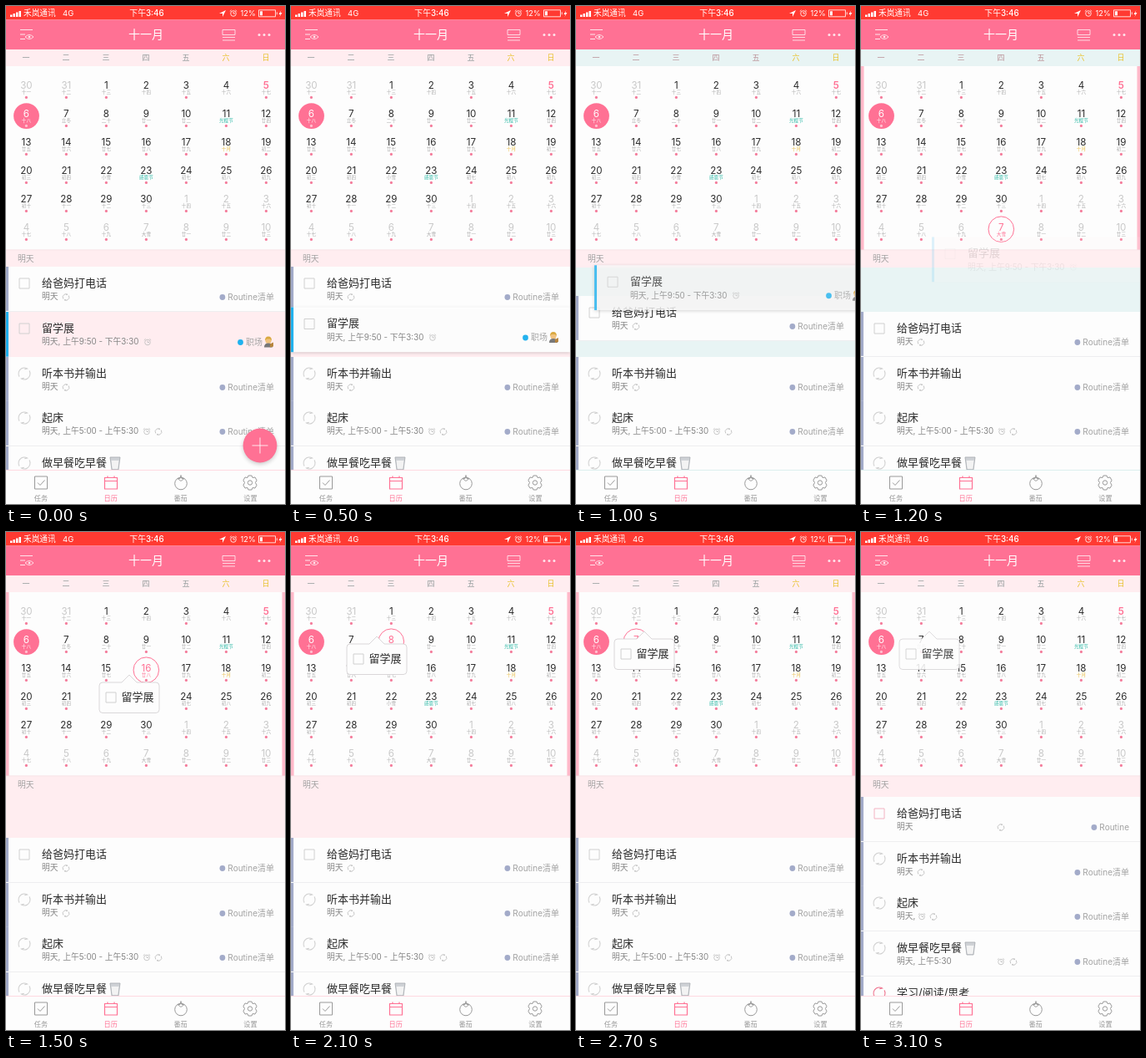
Write an HTML page with a canvas that moves like this. It is 335 px wide and 596 px high and loops after 3.2 s.

```html
<!DOCTYPE html>
<html lang="zh-CN">
<head>
<meta charset="utf-8">
<style>
  html, body { margin: 0; width: 100%; height: 100%; overflow: hidden; background: #fdfdfd; }
  canvas { display: block; width: 335px; height: 596px; }
</style>
</head>
<body>
<canvas id="stage"></canvas>
<script>
const W = 335, H = 596, LOOP = 3200, STEP = 100;
const PINK = '#ff7194', BLUSH = '#ffedf0', MIST = '#e8f4f4', SLATE = '#a3abc9', SKY = '#1fb1ee';
const PAPER = '#fdfdfd', INK = '#2b2b2b', GREY = '#999', PALE = '#c8c8c8', SOFT_WHITE = 'rgba(255,255,255,.82)';
const LIST_TOP = 312.6, ROW = 53.7, FIRST_COL = 24, COL = 48, FIRST_ROW = 95.6, LINE = 34;

const canvas = document.getElementById('stage');
const scale = window.devicePixelRatio || 1;
canvas.width = W * scale;
canvas.height = H * scale;
const c = canvas.getContext('2d');
c.scale(scale, scale);

const clamp = x => Math.max(0, Math.min(1, x));
const smooth = (t, a, b) => { const p = clamp((t - a) / (b - a)); return p * p * (3 - 2 * p); };

// Interpolates [time, value] pairs.
function track(t, ...keys) {
  let i = 0;
  while (i < keys.length - 2 && t > keys[i + 1][0]) i++;
  const [a, from] = keys[i], [b, to] = keys[i + 1];
  return from + (to - from) * clamp((t - a) / (b - a));
}

function rect(x, y, w, h, color) { c.fillStyle = color; c.fillRect(x, y, w, h); }

function text(s, x, y, size, color, align = 'left', weight = 400) {
  c.font = `${weight} ${size}px Inter, "Noto Sans CJK SC", "Noto Sans CJK", sans-serif`;
  c.textAlign = align;
  c.textBaseline = 'middle';
  c.fillStyle = color;
  c.fillText(s, x, y);
}

function disc(x, y, r, color) {
  c.beginPath(); c.arc(x, y, r, 0, 7); c.fillStyle = color; c.fill();
}

function ring(x, y, r, color, width = 1) {
  c.beginPath(); c.arc(x, y, r, 0, 7); c.strokeStyle = color; c.lineWidth = width; c.stroke();
}

function stroke(d, x, y, color, width = 1) {
  c.save();
  c.translate(x, y);
  c.strokeStyle = color;
  c.lineWidth = width;
  c.stroke(new Path2D(d));
  c.restore();
}

function shape(d, x, y, color) {
  c.save();
  c.translate(x, y);
  c.fillStyle = color;
  c.fill(new Path2D(d));
  c.restore();
}

function withAlpha(alpha, draw) {
  c.save(); c.globalAlpha = alpha; draw(); c.restore();
}

function shadowed(blur, dy, draw) {
  c.save();
  c.shadowColor = 'rgba(0,0,0,.2)';
  c.shadowBlur = blur * scale;
  c.shadowOffsetY = dy * scale;
  draw();
  c.restore();
}

const checkbox = (x, y, color = '#d0d0d0') => stroke('M-6-6H6V6H-6Z', x, y, color);

function repeatIcon(x, y, r, color) {
  for (const side of [0, Math.PI]) {
    c.save();
    c.translate(x, y);
    c.rotate(side - Math.PI / 4);
    c.beginPath();
    c.arc(0, 0, r, -2.9, -0.25);
    c.lineTo(r * 0.55, -r * 0.5);
    c.strokeStyle = color;
    c.lineWidth = r > 5 ? 1 : 0.8;
    c.stroke();
    c.restore();
  }
}

function alarmIcon(x, y, color, r = 3.3) {
  ring(x, y, r, color, 0.8);
  stroke('M0-2V0H2M-4.2-2.6L-2.4-4.2M4.2-2.6L2.4-4.2', x, y, color, 0.8);
}

function statusBar() {
  rect(0, 0, W, 16.5, '#ff3a32');
  for (let i = 0; i < 4; i++) rect(5 + i * 3.5, 10.5 - i * 1.5, 2.5, 2.5 + i * 1.5, '#fff');
  text('禾岚通讯', 21, 9.4, 9.7, '#fff');
  text('4G', 68, 9.4, 9.5, '#fff');
  text('下午3:46', 169, 9.4, 9.8, '#fff', 'center', 500);
  shape('M4-4L0 4V0H-4Z', 260, 9, '#fff');
  alarmIcon(273, 9, '#fff');
  text('12%', 281.5, 9.4, 9.2, '#fff');
  stroke('M0 0H20V8H0ZM21.8 2.5V5.5', 303.5, 4.8, '#fff', 0.8);
  rect(305, 6.3, 3, 5, '#fff');
  shape('M1-4L-2 1H0L-1 4L2-1H0Z', 329.5, 9, '#fff');
}

function navBar() {
  rect(0, 16.5, W, 35.5, PINK);
  stroke('M0 0H15M0 5.5H6M0 11H6', 17, 28.5, SOFT_WHITE);
  stroke('M-5 0Q0-5 5 0Q0 5-5 0Z', 28, 37, SOFT_WHITE, 0.9);
  disc(28, 37, 1.3, SOFT_WHITE);
  text('十一月', 168, 35, 14, '#fff', 'center');
  stroke('M0 0H15V6H0ZM0 9H15M0 12.5H15', 260, 28.5, SOFT_WHITE, 0.9);
  for (const x of [304, 310, 316]) disc(x, 34.5, 1.5, SOFT_WHITE);
}

const LUNAR = `十一 十二 十三 十四 十五 十六 十七
十八 立冬 二十 廿一 廿二 光棍节 廿四
廿五 廿六 廿七 廿八 廿九 十月 初二
初三 初四 小雪 感恩节 初七 初八 初九
初十 十一 十二 十三 十四 十五 十六
十七 十八 十九 大雪 廿一 廿二 廿三`.split(/\s+/);
const LUNAR_COLORS = { 光棍节: '#2bb8a5', 感恩节: '#2bb8a5', 十月: '#e9bd45' };

function calendar(hover, tinted, dropping) {
  rect(0, 52, W, 20, tinted ? MIST : BLUSH);
  [...'一二三四五六日'].forEach((day, i) =>
    text(day, FIRST_COL + i * COL, 62, 9, i > 4 ? '#e8c22c' : tinted ? '#b98f96' : '#909a9a', 'center'));
  rect(0, 72, W, 220, PAPER);
  if (dropping) {
    rect(0, 72, 3.5, 220, '#ffb9ca');
    rect(W - 3.5, 72, 3.5, 220, '#ffb9ca');
  }
  LUNAR.forEach((lunar, i) => {
    const x = FIRST_COL + (i % 7) * COL, y = FIRST_ROW + Math.floor(i / 7) * LINE;
    const offset = i - 2;
    const inMonth = offset >= 0 && offset < 30;
    const day = offset < 0 ? offset + 32 : offset % 30 + 1;
    const selected = i === 7, hovered = i === hover;
    if (selected) disc(x + 0.5, y + 2, 15.4, PINK);
    if (hovered) ring(x + 0.3, y + 1.6, 15.3, PINK);
    const accent = selected ? '#fff' : hovered ? PINK : null;
    text(day, x + 0.4, y, 11.6, accent || (i === 6 ? PINK : inMonth ? INK : PALE), 'center', i === 6 ? 600 : 400);
    text(lunar, x + 0.4, y + 8, 5.6, accent || LUNAR_COLORS[lunar] || '#aaa', 'center');
    if (i !== 3 && i !== 5) disc(x + 0.4, y + 13.8, 1.6, selected ? '#ffc0cf' : '#f47c9b');
  });
}

function tag(y, label, color) {
  text(label, 322, y, 10, '#a3a3a3', 'right');
  disc(322 - c.measureText(label).width - 6.5, y, 3.4, color);
}

function cup(x, y) {
  shape('M-6-7H6L4 8H-4Z', x, y, '#cfd2d6');
  shape('M-4.5-3H4.5L3.3 7H-3.3Z', x, y, '#f3f3f3');
  stroke('M-6-7H6L4 8H-4Z', x, y, '#a4a7ac', 0.8);
}

function worker(x, y) {
  disc(x, y - 2, 3.6, '#f1c27d');
  shape('M-4-2Q-4-7 0-7T4-2L2-4H-2Z', x, y, '#d9a93f');
  shape('M-5 6Q-5 1 0 1T5 6Z', x, y, '#777');
  shape('M2 2L6 0V5L2 6Z', x, y, '#b7843c');
}

function row(y, { title, sub, icons = [], label, once, accent }) {
  const top = Math.floor(y);
  rect(0, top, W, ROW + 0.3, PAPER);
  rect(0, top, 3, ROW - 0.8, SLATE);
  rect(3, top + 53, W, 0.8, '#ececee');
  if (once) checkbox(22, top + 20, accent || '#d0d0d0');
  else repeatIcon(22, top + 20, 7, accent || '#cfcfcf');
  text(title, 43, top + 20, 13, INK);
  if (title.startsWith('做早餐')) cup(131, top + 20);
  text(sub, 43, top + 36.5, 9.8, '#858585');
  for (const [kind, x] of icons)
    kind === 'alarm' ? alarmIcon(x, top + 36.5, '#bcbcbc') : repeatIcon(x, top + 36.5, 3.8, '#bcbcbc');
  if (label) tag(top + 36.5, label, SLATE);
}

const listName = 'Routine清单';
const rowsFor = recycled => [
  { title: '给爸妈打电话', sub: '明天', icons: [['repeat', recycled ? 168 : 72]],
    label: recycled ? 'Routine' : listName, once: true, accent: recycled && '#f3b3c2' },
  { title: '听本书并输出', sub: '明天', icons: [['repeat', 72]], label: listName },
  { title: '起床', sub: recycled ? '明天,' : '明天, 上午5:00 - 上午5:30',
    icons: [['alarm', recycled ? 73 : 169], ['repeat', recycled ? 87 : 183]], label: listName },
  { title: '做早餐吃早餐', sub: '明天, 上午5:30', icons: [['alarm', 168], ['repeat', 183]], label: listName },
  { title: '学习/阅读/思考', sub: '明天', accent: '#ee6d89' }
];

function card(x, top, lifted) {
  const paint = () => rect(x, top, W, ROW, lifted ? PAPER : BLUSH);
  if (lifted) shadowed(4, 1, paint); else paint();
  rect(x, top, 3, ROW, SKY);
  checkbox(x + 22, top + 20);
  text('留学展', x + 43, top + 20, 13, INK);
  text('明天, 上午9:50 - 下午3:30', x + 43, top + 36.5, 9.8, '#858585');
  alarmIcon(x + 170, top + 36.5, '#bcbcbc');
  disc(x + 281.5, top + 36.5, 3.4, SKY);
  text('职场', x + 288, top + 36.5, 10, '#a3a3a3');
  worker(x + 315, top + 36.5);
}

function bubble(x, y) {
  c.save();
  c.translate(x, y);
  const p = new Path2D('M0 0L9 9H32Q36 9 36 13V41.5Q36 45.5 32 45.5H-32Q-36 45.5-36 41.5V13Q-36 9-32 9H-9Z');
  c.fillStyle = PAPER;
  c.fill(p);
  c.strokeStyle = '#d6d3d5';
  c.lineWidth = 0.9;
  c.stroke(p);
  checkbox(-22, 27);
  text('留学展', -9.5, 27, 13, INK);
  c.restore();
}

function tabBar(tinted) {
  rect(0, 555, W, 41, PAPER);
  rect(0, 555, W, 1, tinted ? '#dcefee' : '#ffd9e1');
  stroke('M-7.5-7.5H7.5V7.5H-7.5ZM-4 0L-1 3L4.5-3', 42, 570.5, GREY);
  stroke('M-7.5-6H7.5V7.5H-7.5ZM-7.5-2H7.5M-4-8V-6M4-8V-6', 126, 570.5, PINK, 1.2);
  ring(210, 571.5, 7.3, GREY);
  stroke('M-4-5L-1-5L0-9L1-5L4-5L0-2Z', 210, 570.5, GREY, 0.9);
  stroke('M-2-8.5H2L3-6L6-6.5L8-3L6.5 0L8 3L6 6.5L3 6L2 8.5H-2L-3 6L-6 6.5L-8 3L-6.5 0L-8-3L-6-6.5L-3-6Z', 293, 570.5, GREY);
  ring(293, 570.5, 2.7, GREY);
  ['任务', '日历', '番茄', '设置'].forEach((s, i) =>
    text(s, 42 + i * 83.8, 590, 8.2, i === 1 ? PINK : GREY, 'center'));
}

function addButton() {
  shadowed(5, 2, () => disc(305, 526, 20.4, PINK));
  stroke('M-9.5 0H9.5M0-9.5V9.5', 305, 526, SOFT_WHITE);
}

function draw(t) {
  const tinted = t >= 700 && t < 1300;
  const dropping = t >= 1100 && t < 2900;
  const tipX = track(t, [1200, 152], [1500, 148], [2100, 103], [2300, 92], [2600, 82]);
  const tipY = track(t, [1200, 262], [1500, 171], [2100, 125], [2300, 121], [2600, 119]);
  const hover = dropping
    ? Math.floor(tipX / COL) + 7 * Math.round((tipY - FIRST_ROW - 2) / LINE) : -1;

  rect(0, 0, W, H, PAPER);
  calendar(hover, tinted, dropping);

  rect(0, 292, W, 264, tinted ? MIST : BLUSH);
  rect(0, 292, W, 21, BLUSH);
  rect(0, 291.5, W, 0.8, '#f5dde2');
  text('明天', 14, 303, 9.8, '#a0a0a0');

  // The first row makes room for the card; afterwards all rows close the gap.
  const push = smooth(t, 850, 1100);
  const closing = 1 - (1 - clamp((t - 2900) / 285)) ** 2;
  rowsFor(t >= 2900).forEach((item, i) => {
    const slot = i === 0 ? push : 1;
    row(LIST_TOP + (i + slot - closing) * ROW, item);
  });

  if (t < 1300) {
    const top = track(t, [400, 366], [800, 344], [1200, 276.5]);
    const x = 85 * smooth(t, 900, 1200);
    const alpha = track(t, [400, 1], [800, 0.93], [1000, 0.8], [1200, 0.14]);
    withAlpha(alpha, () => card(x, top, t >= 300 && t < 1150));
  }
  if (t > 1200) {
    const alpha = Math.min(clamp((t - 1200) / 150), track(t, [2950, 1], [3100, 0.88]));
    withAlpha(alpha, () => bubble(tipX, tipY));
  }

  tabBar(tinted);
  if (t < 300) addButton();
  statusBar();
  navBar();
}

function frame() {
  const t = performance.now() % LOOP;
  draw(Math.floor(t / STEP) * STEP);
  requestAnimationFrame(frame);
}
frame();
</script>
</body>
</html>
```
